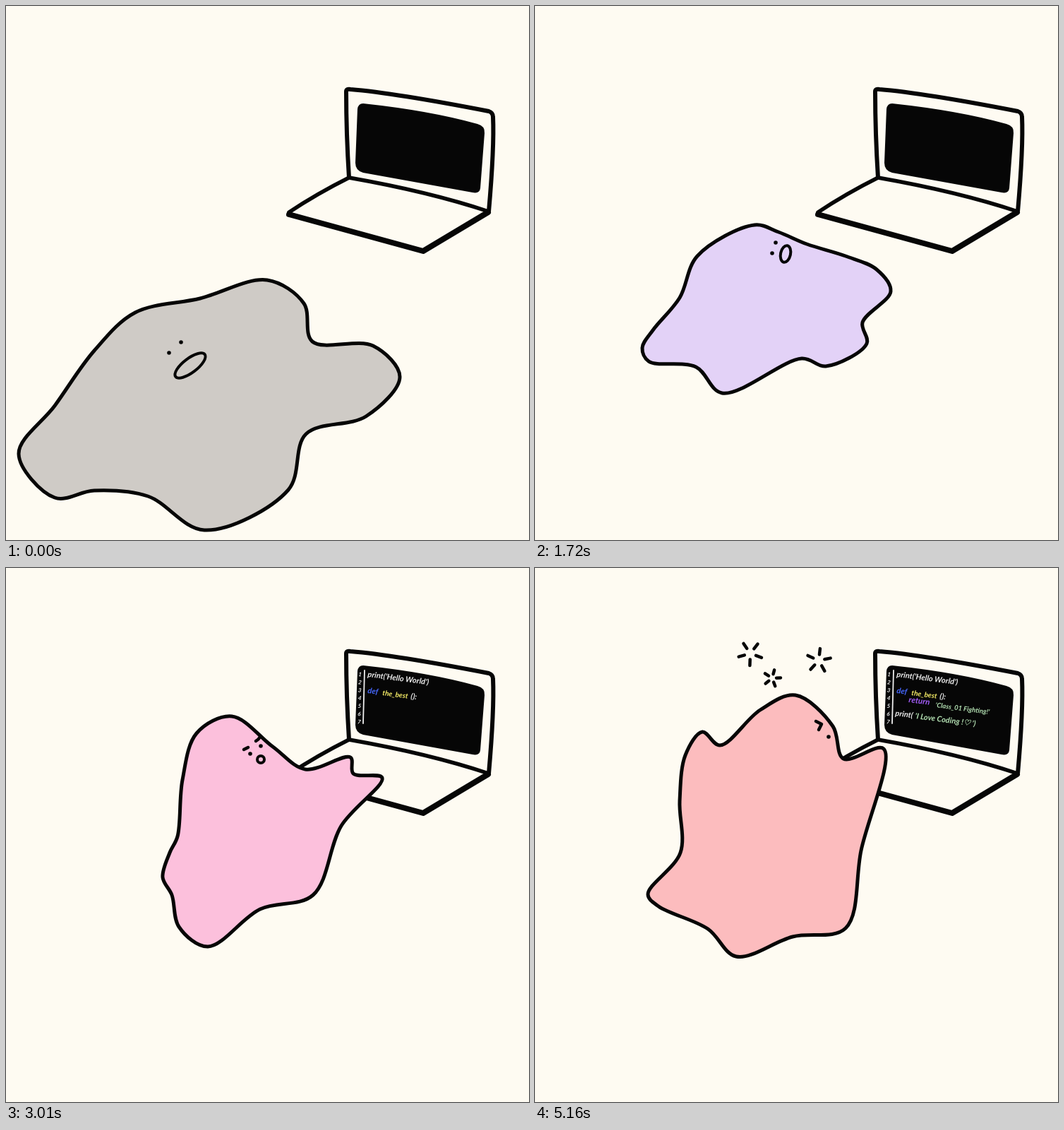
These frames come from a looping animation (741 by 756 pixels, 5.59 s). An HTML page with a canvas:

```html
<!DOCTYPE html>
<html lang="en">
<head>
<meta charset="utf-8">
<title>Blob at a laptop</title>
<style>
  html, body { margin: 0; width: 100%; height: 100%; overflow: hidden; background: #fefbf2; }
  canvas { display: block; }
</style>
</head>
<body>
<canvas id="stage" width="741" height="756"></canvas>
<script>
const ctx = document.getElementById('stage').getContext('2d');
const STEP = 430, STEPS = 13, PAPER = '#fefbf2', INK = '#060606';
const WHITE = '#eeeeee', GREEN = '#b5e2b4';

const mix = (a, b) => a.map((value, i) => (value + b[i]) / 2);
const distance = (p, q) => Math.hypot(q[0] - p[0], q[1] - p[1]);

// Key points run clockwise from the left hip, the same number in every pose.
// A face is: eye x, y, eye x, y, mouth x, y, half length, half width, tilt.
const pose = (color, outline, face) =>
  ({ color, face, outline: outline.split(' ').map(pair => pair.split(',').map(Number)) });

const puddle = pose([207, 203, 198],
  '69,566 125,488 183,434 275,414 370,388 422,421 434,475 520,481 558,525 510,581 425,606 400,685 281,742 201,694 125,686 69,696 18,634',
  [231, 491, 248, 476, 261, 509, 26, 10, -0.65]);
const drop = pose([217, 211, 224],
  '109,526 168,458 208,421 257,407 290,415 330,429 360,436 390,440 418,467 402,492 371,506 345,559 262,596 215,577 186,573 119,595 90,572',
  [259, 462, 273, 449, 287, 471, 14, 11, -0.65]);
const crawl = pose([227, 210, 247],
  '167,459 205,413 230,354 311,310 345,320 385,337 440,354 484,373 504,404 464,448 470,478 412,510 378,499 265,548 228,511 161,503 152,484',
  [336, 350, 341, 335, 355, 351, 12, 7, -1.35]);
const reach = pose([242, 192, 250],
  '238,377 253,320 275,267 328,239 372,262 408,290 462,286 470,301 510,310 460,378 430,438 372,468 302,521 258,488 245,456 209,449 202,420',
  [354, 288, 361, 276, 371, 292, 5, 4, -0.8]);
const type = pose([252, 192, 220],
  '243,380 250,300 270,234 320,210 378,253 424,285 488,268 492,291 533,297 475,365 435,463 360,483 286,536 245,508 235,463 222,438 232,403',
  [346, 263, 361, 252, 361, 271, 5, 5, 0]);
const cheer = pose([252, 188, 190],
  '206,403 205,330 213,265 237,232 262,251 319,201 369,180 422,224 437,270 494,256 462,400 440,510 365,522 285,550 245,511 175,479 160,462');

const between = (a, b) => ({
  color: mix(a.color, b.color),
  face: mix(a.face, b.face),
  outline: a.outline.map((p, i) => mix(p, b.outline[i]))
});

const poses = [
  puddle, between(puddle, drop), drop, between(drop, crawl), crawl, between(crawl, reach),
  reach, type, { ...cheer, shift: [-23, 6] }, cheer
];

// Each row: first step, text, x, y, colour, size.
const code = [
  [6, "print('Hello World')", 512, 154, WHITE, 11],
  [7, 'def', 512, 177, '#4668ff', 11],
  [7, 'the_best', 533, 180, '#f7ee67', 10],
  [7, '():', 573, 185, WHITE, 11],
  [8, 'return', 529, 190, '#a05cf5', 11.5],
  [8, "'Class_01 Fighting!'", 567, 197, GREEN, 9.5],
  [9, 'print(', 510, 209, WHITE, 11],
  [9, "'I Love Coding !♡ ')", 538, 213, GREEN, 11]
];

// Closed centripetal Catmull-Rom curve through the knots.
function trace(knots) {
  const at = i => knots[(i + knots.length) % knots.length];
  ctx.beginPath();
  ctx.moveTo(...knots[0]);
  knots.forEach((b, i) => {
    const a = at(i - 1), c = at(i + 1), d = at(i + 2);
    const [ab, bc, cd] = [[a, b], [b, c], [c, d]].map(([p, q]) => Math.sqrt(distance(p, q)));
    const slope = j => (c[j] - b[j]) / bc;
    const leave = j => b[j] + bc / 3 * ((b[j] - a[j]) / ab - (c[j] - a[j]) / (ab + bc) + slope(j));
    const arrive = j => c[j] - bc / 3 * (slope(j) - (d[j] - b[j]) / (bc + cd) + (d[j] - c[j]) / cd);
    ctx.bezierCurveTo(leave(0), leave(1), arrive(0), arrive(1), ...c);
  });
  ctx.closePath();
}

function line(path, width, color = INK) {
  ctx.lineWidth = width;
  ctx.strokeStyle = color;
  ctx.stroke(new Path2D(path));
}

function dot(x, y) {
  ctx.fillStyle = INK;
  ctx.beginPath();
  ctx.arc(x, y, 2.8, 0, 7);
  ctx.fill();
}

function write(text, x, y, color, size) {
  ctx.save();
  ctx.translate(x, y);
  ctx.rotate(0.13);
  ctx.font = `italic bold ${size}px Lato, sans-serif`;
  ctx.fillStyle = color;
  ctx.fillText(text, 0, 0);
  ctx.restore();
}

function drawLaptop() {
  line('M486 243Q482 180 482 121Q482 117 488 118Q550 123 684 149Q690 151 690 157Q692 200 684 291', 6);
  line('M401 292Q440 266 486 243Q600 263 684 291', 5.5);
  line('M401 295L591 347L683 292', 8);
  ctx.fillStyle = INK;
  ctx.fill(new Path2D('M506 138Q600 148 668 167Q679 170 678 180L672 258Q671 266 661 264L506 236Q495 233 495 222L498 146Q499 138 506 138Z'));
}

function drawCode(step) {
  if (step < 6) return;
  line('M508 145L506 220', 1.8, WHITE);
  for (let i = 0; i < 7; i++) write(i + 1, 499 - i * 0.2, 153 + i * 11.2, WHITE, 8);
  code.filter(([first]) => step >= first).forEach(([, ...row]) => write(...row));
}

function drawFace([x1, y1, x2, y2, x, y, length, width, tilt]) {
  dot(x1, y1);
  dot(x2, y2);
  ctx.beginPath();
  ctx.ellipse(x, y, length, width, tilt, 0, 7);
  ctx.lineWidth = 4;
  ctx.stroke();
}

function drawBlob({ color, outline, face, shift = [0, 0] }, frowning) {
  ctx.save();
  ctx.translate(...shift);
  trace(outline);
  ctx.fillStyle = `rgb(${color})`;
  ctx.fill();
  ctx.lineWidth = 5;
  ctx.strokeStyle = INK;
  ctx.stroke();
  if (face) {
    drawFace(face);
  } else {
    line('M398 217L406 221L402 229', 4.5);
    dot(416, 239);
  }
  if (frowning) line('M337 257L343 254M354 245Q358 243 360 239', 4.5);
  ctx.restore();
}

function drawSpark(x, y, radius, turn) {
  ctx.lineWidth = 4.5;
  ctx.strokeStyle = INK;
  ctx.beginPath();
  for (let ray = 0; ray < 5; ray++) {
    const angle = turn + ray * Math.PI * 0.4, dx = Math.cos(angle), dy = Math.sin(angle);
    ctx.moveTo(x + dx * radius / 2, y + dy * radius / 2);
    ctx.lineTo(x + dx * radius, y + dy * radius);
  }
  ctx.stroke();
}

function draw() {
  const step = Math.floor(performance.now() / STEP) % STEPS;
  ctx.lineCap = ctx.lineJoin = 'round';
  ctx.fillStyle = PAPER;
  ctx.fillRect(0, 0, 741, 756);
  drawLaptop();
  drawCode(step);
  const current = poses[Math.min(step, poses.length - 1)];
  drawBlob(current, current === type);
  if (step >= 10) drawSpark(336, 156, 12, -0.05);
  if (step >= 11) drawSpark(402, 131, 17, -0.2);
  if (step >= 12) drawSpark(305, 121, 17, 0.35);
  requestAnimationFrame(draw);
}
draw();
</script>
</body>
</html>
```
